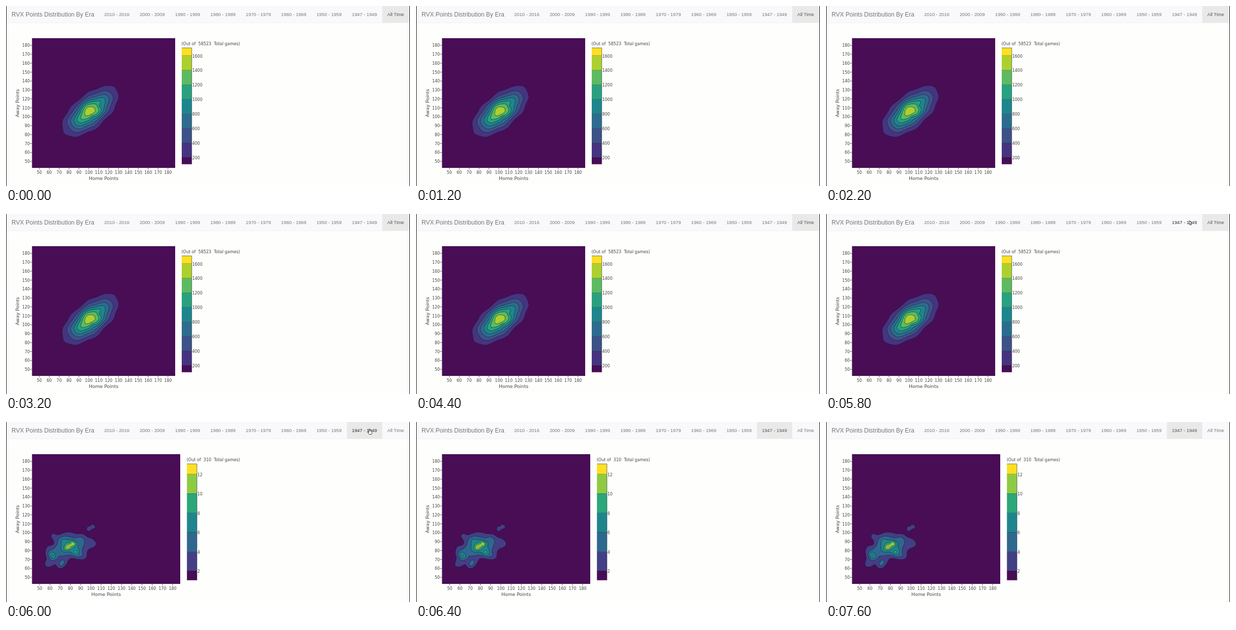
Animation, 800 px wide and 358 px high, one loop 8000 ms. Source, as an HTML page with a canvas:

```html
<!DOCTYPE html>
<html lang="en">
<head>
<meta charset="utf-8">
<title>Points by era</title>
<style>
html, body { margin: 0; width: 100%; height: 100%; overflow: hidden; background: #fefefd; }
svg { display: block; width: 800px; height: 358px; }
canvas { position: absolute; }
text { white-space: pre; }
.nav { font: 9.33px "Liberation Sans", Arial, sans-serif; fill: #777; }
.brand { font: 12px "Liberation Sans", Arial, sans-serif; fill: #777; }
.chart text { font: 8px "DejaVu Sans", Verdana, sans-serif; fill: #444; }
.chart .title { font-size: 9.33px; }
.chart .games { font-size: 8.1px; }
.tick { stroke: #444; stroke-width: .8; }
.split { stroke: #14202c; stroke-width: .6; }
</style>
</head>
<body>
<svg id="stage" viewBox="0 0 800 358"></svg>
<script>
const LOOP = 8000, SWITCH = 6000, DARK = '#480d55', YELLOW = '#fde021';
const PLOT = { left: 51.5, top: 64, bottom: 322 };
const stage = document.getElementById('stage');

function add(parent, tag, attrs = {}, text) {
  const el = document.createElementNS('http://www.w3.org/2000/svg', tag);
  for (const key in attrs) el.setAttribute(key, attrs[key]);
  if (text !== undefined) el.textContent = text;
  parent.appendChild(el);
  return el;
}
const rect = (parent, x, y, width, height, fill) =>
  add(parent, 'rect', { x, y, width, height, fill });
const line = (parent, x1, y1, x2, y2, cls = 'tick') =>
  add(parent, 'line', { x1, y1, x2, y2, class: cls });
const label = (parent, x, y, text, anchor = 'start', cls = '') =>
  add(parent, 'text', { x, y, 'text-anchor': anchor, class: cls }, text);

// Density is one tilted hill plus round bumps: x, y, radius, height in levels
const allTime = {
  right: 335, stepX: 19.6, x50: 66, games: 58523,
  barX: 348, barTop: 98.5, barStep: 28.93, inc: 200,
  colors: [DARK, '#463480', '#3c5289', '#2d6c8e', '#1f858c', '#28a17f', '#5cbb60', '#add02f', YELLOW],
  hill: { x: 166.5, y: 210, a: 47.4, b: 23.3, tilt: 40, height: 7.4 },
  bumps: [[160, 207, 10, .6], [187, 198, 5, -.8], [172, 221, 6, -.9], [212, 165, 8, .4]]
};

const early = {
  right: 345, stepX: 20.25, x50: 66.8, games: 310,
  barX: 358.3, barTop: 103.5, barStep: 38.5, inc: 2,
  colors: [DARK, '#433f85', '#2f688e', '#1f858c', '#2ca77a', '#8fcb42', YELLOW],
  hill: { x: 123, y: 248, a: 40, b: 25, tilt: 8, height: 3.3 },
  bumps: [
    [122, 250, 7, 2.9], [132, 241.5, 6, 2.7], [140, 259, 8, 2], [92, 266, 8, 2.8],
    [113, 235, 9, .9], [148, 234, 8, 1.1], [110, 282, 9, 1.9], [85, 282, 10, 1.5],
    [171, 240, 9, .8], [95, 226, 6, .6], [153, 267, 8, .9], [163, 213, 6, 1.2],
    [172, 207, 6, 1.3], [90, 241, 8, -.8], [133, 277, 9, -.6]
  ]
};

function density({ hill, bumps }, px, py) {
  const x = px + 1.2 * Math.sin(py / 5), y = py + 1.2 * Math.sin(px / 6);
  const angle = hill.tilt * Math.PI / 180, cos = Math.cos(angle), sin = Math.sin(angle);
  const dx = x - hill.x, dy = y - hill.y;
  const u = (dx * cos - dy * sin) / hill.a, v = (dx * sin + dy * cos) / hill.b;
  return bumps.reduce(
    (sum, [bx, by, r, h]) => sum + h * Math.exp(-((x - bx) ** 2 + (y - by) ** 2) / (r * r)),
    hill.height * Math.exp(-u * u - v * v));
}

// Filled bands with a thin dark line on every whole level
function drawContours(c) {
  const x0 = 60, y0 = 150, w = 190, h = 150, scale = 2, eps = .25;
  const canvas = document.createElement('canvas');
  canvas.width = w * scale;
  canvas.height = h * scale;
  canvas.style.cssText = `left:${x0}px;top:${y0}px;width:${w}px;height:${h}px`;
  const ctx = canvas.getContext('2d');
  const img = ctx.createImageData(canvas.width, canvas.height);
  const rgb = c.colors.map(s => [1, 3, 5].map(i => parseInt(s.slice(i, i + 2), 16)));
  const ink = [20, 28, 50];
  for (let j = 0, k = 0; j < canvas.height; j++) {
    for (let i = 0; i < canvas.width; i++, k += 4) {
      const x = x0 + (i + .5) / scale, y = y0 + (j + .5) / scale;
      const f = density(c, x, y);
      const slope = Math.hypot(density(c, x + eps, y) - f, density(c, x, y + eps) - f) / eps;
      const level = Math.round(f);
      const gap = level > 0 ? Math.abs(f - level) / (slope + .01) : 1;
      const mix = .75 * Math.max(0, 1 - gap / .7);
      const base = rgb[Math.max(0, Math.min(rgb.length - 1, Math.floor(f)))];
      base.forEach((v, n) => img.data[k + n] = v + (ink[n] - v) * mix);
      img.data[k + 3] = 255;
    }
  }
  ctx.putImageData(img, 0, 0);
  document.body.appendChild(canvas);
  return canvas;
}

function drawChart(c) {
  const g = add(stage, 'g', { class: 'chart' });
  const { left, top, bottom } = PLOT, mid = (left + c.right) / 2;
  rect(g, left, top, c.right - left, bottom - top, DARK);

  for (let v = 50; v <= 180; v += 10) {
    const k = (v - 50) / 10;
    const x = c.x50 + k * c.stepX, y = 309 - k * 17.75;
    line(g, x, bottom, x, bottom + 3.3);
    label(g, x, 333.6, v, 'middle');
    line(g, 47.5, y, left, y);
    label(g, 47.2, y + 3, v, 'end');
  }
  label(g, mid, 346, 'Home Points', 'middle', 'title');
  label(g, 0, 0, 'Away Points', 'middle', 'title')
    .setAttribute('transform', 'translate(26.3 193) rotate(-90)');

  // Colour bar, from the lowest band up
  label(g, c.barX - .6, 78, `(Out of  ${c.games}  Total games)`, 'start', 'games');
  const last = c.colors.length - 1, barW = 19.8;
  const edge = i => c.barTop + (last - i) * c.barStep;
  c.colors.forEach((color, i) => {
    const y1 = i === last ? 83.3 : edge(i + 1);
    const y2 = i === 0 ? 314.7 : edge(i);
    rect(g, c.barX, y1, barW, y2 - y1, color);
    line(g, c.barX, y1, c.barX + barW, y1, 'split');
    if (i) label(g, c.barX + 20.7, edge(i) + 4, i * c.inc);
  });
  line(g, c.barX + barW, 83.3, c.barX + barW, 314.7, 'split');
  return [g, drawContours(c)];
}

rect(stage, 0, 0, 800, 33, '#f9f9fc');
rect(stage, 0, 33, 800, .7, '#ececee');
const active = rect(stage, 745, 0, 54, 33.3, '#e9e9ea');
label(stage, 11, 21, 'RVX Points Distribution By Era', 'start', 'brand');

const decades = Array.from({ length: 6 }, (_, i) => 2000 - 10 * i).map(y => `${y} - ${y + 9}`);
const tabs = ['2010 - 2016', ...decades, '1947 - 1949', 'All Time']
  .map((name, i) => label(stage, 194.6 + 70.05 * i, 20, name, 'start', 'nav'));
const [earlyTab, allTab] = tabs.slice(-2);

const charts = [allTime, early].map(drawChart);
rect(stage, 0, 0, 1, 358, '#111');
rect(stage, 799, 0, 1, 358, '#111');

const pointer = { fill: '#fff', stroke: '#111', 'stroke-width': .8, 'stroke-linejoin': 'round' };
const cursors = {
  arrow: add(stage, 'path', { ...pointer, d: 'M0 0V8L1.8 6.4 3 9.2 4.2 8.7 3 6H5.2Z' }),
  hand: add(stage, 'path', {
    ...pointer,
    d: 'M2.6 6.4V1Q3.4-.2 4.2 1V4.4Q5.4 3.6 5.9 4.8 7 4 7.4 5.2 8.6 4.7 8.7 6V8.6L7.7 11.4H3.4L.4 7.6Q.6 6 2.6 7.4Z'
  })
};

// time, cursor, x, y
const steps = [
  [0], [5400, 'arrow', 727, 14], [5600, 'hand', 716, 11.5],
  [5800, 'arrow', 719.3, 13], [SWITCH, 'hand', 716, 13.3], [6200]
];

function draw(t) {
  const [, kind, x, y] = steps.filter(s => s[0] <= t).pop();
  const switched = t >= SWITCH;
  charts.forEach((parts, i) => parts.forEach(el =>
    el.style.display = switched === !!i ? '' : 'none'));
  active.setAttribute('x', switched ? 675 : 745);
  active.setAttribute('width', switched ? 70 : 54);
  earlyTab.style.fill = kind ? '#2a2a2a' : switched ? '#555' : '#777';
  allTab.style.fill = switched ? '#777' : '#555';
  for (const name in cursors) {
    cursors[name].style.display = name === kind ? '' : 'none';
    if (name === kind) cursors[name].setAttribute('transform', `translate(${x} ${y})`);
  }
}

function tick() {
  draw(performance.now() % LOOP);
  requestAnimationFrame(tick);
}
tick();
</script>
</body>
</html>
```
